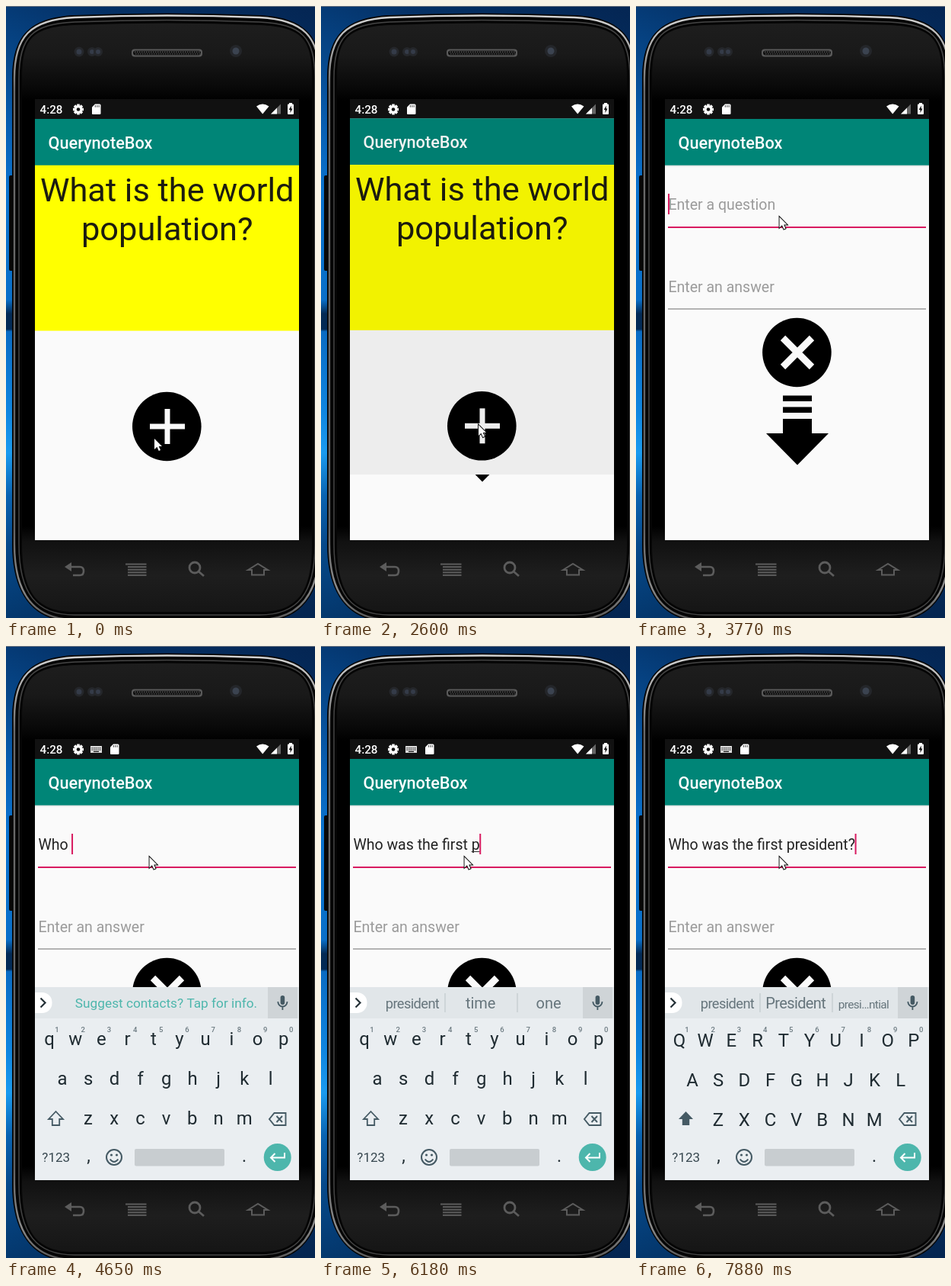
Write an HTML page with a canvas that moves like this. It is 406 px wide and 802 px high and loops after 8 s.

```html
<!DOCTYPE html>
<html lang="en">
<head>
<meta charset="utf-8">
<title>Flashcards on a phone</title>
<style>
html, body { margin: 0; width: 100%; height: 100%; overflow: hidden; background: #000; }
canvas { display: block; }
</style>
</head>
<body>
<canvas id="stage" width="406" height="802"></canvas>
<script>
const LOOP = 8000;
const TITLE = 'QuerynoteBox';
const QUESTION = 'Who was the first president?';
const FONT = 'Roboto, "Noto Sans", sans-serif';
const PINK = '#d81b60', TEAL = '#4db6ac', PAPER = '#fafafa', KEY_ICON = '#455a64';
const BAR_END = 208.7, CARD_END = 425.6;
const TAU = Math.PI * 2;
const ctx = document.getElementById('stage').getContext('2d');

// time, x, y
const MOUSE = [[0, 195, 567], [680, 199, 561], [830, 210, 547], [1510, 217, 553], [1630, 225, 560],
  [2450, 222, 544], [2600, 207, 549], [2870, 207, 550], [3020, 205, 500], [3140, 198, 400], [3260, 191, 310],
  [3380, 188.5, 276.5]];
// time, number of typed characters
const TYPED = [[0, 0], [4410, 1], [4530, 3], [4650, 4], [4800, 5], [4920, 7], [5040, 8], [5160, 9], [5280, 11],
  [5420, 12], [5540, 13], [5660, 14], [5780, 16], [5930, 18], [6180, 19], [6320, 20], [6450, 21], [6850, 22],
  [7000, 23], [7120, 24], [7240, 25], [7510, 26], [7630, 27], [7880, 28]];
// characters needed, words offered
const HINTS = [[5, 'was would will'], [7, 'was wash want'], [8, 'the a your'], [9, 'the to this'], [11, 'the they then'],
  [12, 'first best same'], [13, 'first front final'], [16, 'first firstly firs'], [18, 'president time one'],
  [20, 'president prime price'], [21, 'president previous present'], [23, 'president presiding presi…ntial'],
  [26, 'president President presi…ntial']];
// time, drop of the new screen, top of its revealed part
const OPENING = [[2600, 22, 614], [2750, 5, 165], [2870, 1, 148], [3020, 0, 148]];

const last = (list, t) => list.filter(e => e[0] <= t).pop();

function rect(x, y, w, h, color) {
  ctx.fillStyle = color;
  ctx.fillRect(x, y, w, h);
}

function disc(x, y, r, color) {
  ctx.fillStyle = color;
  ctx.beginPath();
  ctx.arc(x, y, r, 0, TAU);
  ctx.fill();
}

function fill(d, color) {
  ctx.fillStyle = color;
  ctx.fill(new Path2D(d));
}

function stroke(d, color, width = 2) {
  ctx.strokeStyle = color;
  ctx.lineWidth = width;
  ctx.stroke(new Path2D(d));
}

function pill(x, y, w, h, r, color) {
  ctx.fillStyle = color;
  ctx.beginPath();
  ctx.roundRect(x, y, w, h, r);
  ctx.fill();
}

function text(str, x, y, size, color, align = 'left', weight = 400) {
  ctx.font = `${weight} ${size}px ${FONT}`;
  ctx.textAlign = align;
  ctx.fillStyle = color;
  ctx.fillText(str, x, y);
}

function gradient(x1, y1, stops) {
  const g = ctx.createLinearGradient(0, 0, x1, y1);
  stops.forEach(([p, c]) => g.addColorStop(p, c));
  return g;
}

function shifted(dx, dy, draw) {
  ctx.save();
  ctx.translate(dx, dy);
  draw();
  ctx.restore();
}

function clipped(y0, y1, draw) {
  ctx.save();
  ctx.beginPath();
  ctx.rect(38, y0, 347, y1 - y0);
  ctx.clip();
  draw();
  ctx.restore();
}

// Phone outline, i pixels inside its edge
function body(i) {
  const l = 8 + i, r = 415 - i, t = 10 + i, b = 807 - i;
  return `M${l} 95C${l} 40 ${30 + i / 2} ${t + 5} 90 ${t + 2}Q212 ${t - 3} 333 ${t + 2}` +
    `C${393 - i / 2} ${t + 5} ${r} 40 ${r} 95V705C${r} 770 ${388 - i / 2} ${b} 333 ${b}` +
    `H90C${35 + i / 2} ${b} ${l} 770 ${l} 705Z`;
}

function drawPhone() {
  rect(0, 0, 406, 802, gradient(0, 802, [[0, '#053a75'], [.08, '#06478a'], [.2, '#0860b4'], [.3, '#0a74d0'], [.48, '#0a70ca'],
    [.503, '#032a55'], [.528, '#032a55'], [.532, '#0a6cc4'], [.66, '#0f86e0'], [.73, '#1b9cf0'], [.8, '#0a64b2'],
    [.88, '#064a8c'], [1, '#04386e']]));
  rect(0, 0, 406, 802, gradient(406, 0, [[0, 'rgba(4,24,60,0)'], [.3, 'rgba(4,24,60,.3)'], [1, 'rgba(4,24,60,.6)']]));
  rect(0, 0, 406, 1, '#6b7480');
  pill(4, 222, 8, 125, 2, '#080808');
  fill(body(0), '#050505');
  stroke(body(3), gradient(0, 802, [[0, '#e0e0e0'], [.05, '#b8b8b8'], [.14, '#6a6a6a'], [.85, '#626262'], [.95, '#8a8a8a'], [1, '#5a5a5a']]), 2.4);
  stroke(body(9), '#454545', 1.5);
  fill(body(13), gradient(0, 802, [[0, '#202020'], [.08, '#191919'], [.135, '#080808'], [.155, '#000'],
    [.85, '#000'], [.875, '#111'], [.93, '#1e1e1e'], [1, '#141414']]));

  pill(165, 56.5, 93, 10, 4, '#5a5a5a');
  pill(167, 58.5, 89, 6, 3, '#111');
  for (let x = 169; x < 255; x += 3) {
    rect(x, 59.5, 1.5, 1.5, '#555');
    rect(x + 1, 62, 1.5, 1.5, '#484848');
  }
  [[96, 6.5], [113, 6], [121, 6]].forEach(([x, r]) => {
    disc(x, 60, r, '#25272b');
    disc(x, 60, r - 3, '#343b48');
  });
  disc(302, 59, 8, '#24262a');
  disc(302, 59, 4.5, '#3b4350');

  const gray = '#5c5c5c';
  stroke('M83 735H97Q102 735 102 740.5Q102 746 97 746H88', gray, 2.6);
  fill('M77 735L86 729V741Z', gray);
  for (let i = 0; i < 5; i++) rect(i ? 160 : 157, 730.5 + i * 3.6, i ? 24.500 : 27.500, 2, gray);
  stroke('M255 736A7 7 0 1 1 241 736A7 7 0 1 1 255 736M253 741L260 747', gray, 2.8);
  stroke('M318 739L331 731L344 739H339V745.5H323V739Z', gray, 2);
}

function drawStatus(keyboard) {
  text('4:28', 44.5, 141, 15.2, '#fff', 'left', 500);
  shifted(95, 135.5, () => {
    for (let i = 0; i < 4; i++) {
      rect(-1.8, -7, 3.6, 14, '#fff');
      ctx.rotate(Math.PI / 4);
    }
    disc(0, 0, 5.3, '#fff');
    disc(0, 0, 2.3, '#111');
  });
  if (keyboard) {
    rect(111, 131, 15, 9, '#ddd');
    for (let i = 0; i < 5; i++) {
      rect(112.5 + i * 2.6, 133, 1.3, 1.3, '#111');
      rect(112.5 + i * 2.6, 135.4, 1.3, 1.3, '#111');
    }
    rect(115, 137.8, 7, 1.2, '#111');
  }
  shifted(keyboard ? 24 : 0, 0, () => {
    fill('M117 128.5H123Q124.5 128.5 124.5 130V141Q124.5 142 123 142H114Q113 142 113 141V132.5Z', '#fff');
    for (let i = 0; i < 3; i++) rect(116.8 + i * 2.4, 130, 1.1, 2.7, '#555');
  });
  fill('M329 131.5Q337 125.5 345.5 131.5L337.2 141.5Z', '#fff');
  fill('M361 128.5V141.5H348Z', '#666');
  fill('M356 133.5V141.5H348Z', '#fff');
  rect(372, 127, 4, 2, '#fff');
  pill(370, 128.5, 8, 13.5, 1, '#fff');
  fill('M374.7 130.5L371.7 136H373.5V140L376.5 134.5H374.7Z', '#111');
}

function drawToolbar() {
  rect(38, 122, 347, 26, '#111');
  rect(38, 148, 347, BAR_END - 148, '#008577');
  text(TITLE, 55.5, 186.5, 21.7, '#fff', 'left', 500);
}

function drawCard() {
  rect(38, 148, 347, 560, PAPER);
  rect(38, 200, 347, CARD_END - 200, '#ff0');
  drawToolbar();
  text('What is the world', 211.7, 255.5, 43.4, '#1c1c10', 'center');
  text('population?', 211.7, 306.5, 43.4, '#1c1c10', 'center');
  disc(211.3, 551, 45.3, '#000');
  rect(189, 547.5, 46, 7, PAPER);
  rect(208.5, 528, 7, 46, PAPER);
}

function drawForm(t, typed) {
  rect(38, 148, 347, 560, PAPER);
  rect(38, 208, 347, 2, '#dfe3e3');
  rect(38, 210, 347, 1, '#f1f1f1');
  drawToolbar();

  const str = QUESTION.slice(0, typed);
  if (typed) text(str, 42.4, 267, 19.52, '#222');
  else text('Enter a question', 42.4, 267, 19.52, '#9b9b9b');
  if (t >= 3770) {
    const end = 42.4 + (typed ? ctx.measureText(str).width : 0);
    const word = str.match(/\w+$/);
    if (word) {
      const w = ctx.measureText(word[0]).width;
      rect(end - w, 269, w, 1, '#333');
    }
    rect(typed ? end - .4 : 42, 246, 2, 27, PINK);
  }
  rect(42, 289.2, 339, 1.2, '#858585');
  if (t >= 3770) rect(42, 289, 339, 2, PINK);
  else if (t >= 3650) rect(95, 289, 200, 2, PINK);

  text('Enter an answer', 42.4, 375, 19.52, '#9b9b9b');
  rect(42, 396.4, 339, 1.2, '#858585');

  disc(211.4, 454, 45.3, '#000');
  stroke('M193 435L231 473M231 435L193 473', PAPER, 9);
  rect(193, 510.5, 38, 7.5, '#000');
  rect(193, 525.5, 38, 7.5, '#000');
  fill('M193 541H231V560H253L212 601.5L171 560H193Z', '#000');
}

// Tighten a long word, then make it smaller, until it fits its slot
function suggestion(word, x, slot) {
  const size = 20;
  ctx.font = `${size}px ${FONT}`;
  if (ctx.measureText(word).width > slot) ctx.letterSpacing = '-0.6px';
  const fit = Math.min(1, slot / ctx.measureText(word).width);
  text(word, x, 475, size * fit, '#66757c', 'center');
  ctx.letterSpacing = '0px';
}

function drawKeyboard(typed) {
  const caps = typed === 0 || typed === QUESTION.length;
  const ink = '#1f2b31';
  rect(38, 447, 347, 253, '#eaeef1');
  rect(38, 447, 347, 41, '#e1e6e9');
  rect(344, 447, 39, 41, '#cfd4d7');
  pill(38, 454, 22.5, 27, [0, 13, 13, 0], '#fff');
  stroke('M45.5 461.5L51.5 467.5L45.5 473.5', '#263238', 2.2);
  pill(360.6, 458, 5.6, 12, 2.8, KEY_ICON);
  stroke('M357.3 466A6.1 6.5 0 0 0 369.5 466M363.4 472.5V477', KEY_ICON, 1.8);

  const hint = last(HINTS, typed);
  if (hint) {
    hint[1].split(' ').forEach((w, i) => suggestion(w, [120, 209.7, 299][i], [71, 80, 68][i]));
    rect(162.5, 455, 1, 25, '#bcc4c8');
    rect(257.5, 455, 1, 25, '#bcc4c8');
  } else {
    text('Suggest contacts? Tap for info.', 210.5, 474, 17.25, TEAL, 'center');
  }

  ['qwertyuiop', 'asdfghjkl', 'zxcvbnm'].forEach((row, r) => {
    [...row].forEach((c, i) => {
      const x = [57, 74, 108][r] + i * 34.2;
      const y = 523 + r * 51.8 + (caps ? 2 : 0);
      text(caps ? c.toUpperCase() : c, x, y, 23.9, ink, 'center');
      if (r === 0) text((i + 1) % 10, x + 10, 506, 9.5, '#6c7a81', 'center', 500);
    });
  });

  const shift = 'M65.5 610L75 620H70.2V628H60.8V620H56Z';
  if (caps) fill(shift, KEY_ICON);
  else stroke(shift, KEY_ICON, 1.8);
  stroke('M352.5 612H367.5V628H352.5L346 620ZM355.5 616L363 624M363 616L355.5 624', KEY_ICON, 1.9);

  text('?123', 65.7, 676, 17, '#37474f', 'center');
  text(',', 108.5, 676, 23, ink, 'center');
  text('.', 313, 676, 23, ink, 'center');
  stroke('M152 670A10 10 0 1 1 132 670A10 10 0 1 1 152 670M136.7 672.5Q142 679.5 147.3 672.5', KEY_ICON, 2);
  disc(138.5, 667, 1.6, KEY_ICON);
  disc(145.5, 667, 1.6, KEY_ICON);
  pill(169, 659, 118, 22.5, 2, '#c8cdd0');
  disc(356.7, 670, 18, TEAL);
  stroke('M366 664V670.5H348.5M353.5 665L348 670.5L353.5 676', '#fff', 2);
}

function drawMouse(x, y) {
  shifted(x, y, () => {
    const d = 'M0 0V14L3.4 10.8L5.8 16L8 15L5.7 10H10Z';
    stroke(d, '#000', 1.8);
    fill(d, '#fff');
  });
}

function drawScreen(t) {
  const typed = last(TYPED, t)[1];
  const opening = last(OPENING, t);
  const keyboard = t >= 4150;
  clipped(122, 700, () => {
    if (t < 3020) {
      rect(38, 122, 347, 26, '#111');
      const rise = t < 2600 ? 0 : t < 2750 ? -.7 : -9;
      shifted(0, rise, drawCard);
      if (opening) rect(38, 148 + rise, 347, 560, 'rgba(0,0,0,.05)');
    }
    if (opening) {
      clipped(opening[2], 700, () => shifted(0, opening[1], () => drawForm(t, typed)));
    }
    if (t >= 2870) rect(38, 122, 347, 26, '#111');
    if (keyboard) {
      ctx.globalAlpha = t < 4290 ? .6 : 1;
      drawKeyboard(typed);
      ctx.globalAlpha = 1;
    }
    drawStatus(keyboard);
  });
}

function frame(now) {
  const t = (now - start) % LOOP;
  drawPhone();
  drawScreen(t);
  const [, x, y] = last(MOUSE, t);
  drawMouse(x, y);
  requestAnimationFrame(() => frame(performance.now()));
}

const start = performance.now();
frame(start);
</script>
</body>
</html>
```
